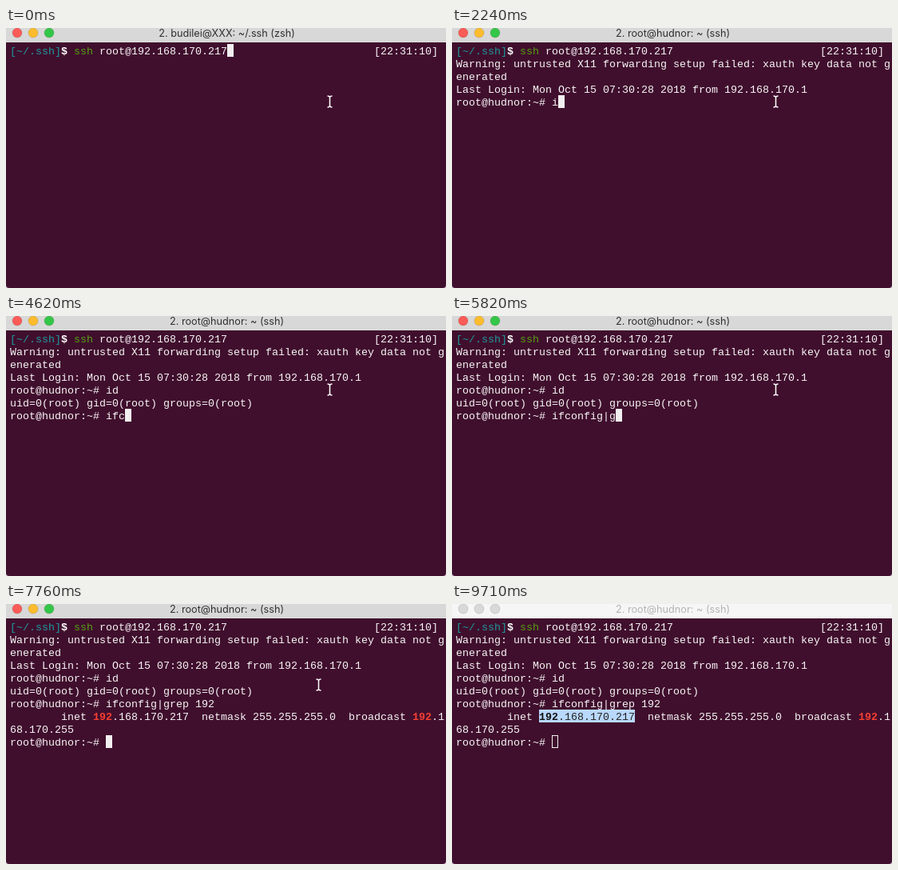
Recreate the animation shown at these times as an HTML page with a canvas. Size 551 px wide and 325 px high, loop 9.81 s.

```html
<!DOCTYPE html>
<html lang="en">
<head>
<meta charset="utf-8">
<title>Terminal session</title>
<style>
  html, body { margin: 0; width: 100%; height: 100%; overflow: hidden; }
  canvas { display: block; }
</style>
</head>
<body>
<canvas id="stage" width="551" height="325"></canvas>
<script>
const ctx = document.getElementById('stage').getContext('2d');
const W = 551, H = 325, BAR = 18;
const LOOP = 9810, TICK = 149.1, UNFOCUS = LOOP - 100;
const CELL = 8, ROW = 16, LEFT = 5, TOP = 20;
const MONO = '13.33px "Liberation Mono", monospace';
const SANS = '12.7px Inter, sans-serif';
const BG = '#400f2d', TEXT = '#f8f5f7', RED = '#f63f33', SELECT = '#b9d8fd';
const PROMPT = 'root@hudnor:~# ';
const ADDRESS_COL = 13, ADDRESS_END = 28;

// The screen refreshes once per tick; all moments below are tick numbers.
const WAIT = 3, WARN = 6, LOGIN = 7, CONNECTED = 12, TYPE_ID = 15, ID_DONE = 19,
  BLINK_OFF = 24, BLINK_ON = 27, TYPE_GREP = 29, GREP_DONE = 48, DRAG = 55, RELEASE = 59;

// Keys pressed in each tick; an empty entry is a pause.
const ID_KEYS = ['i', 'd'];
const GREP_KEYS = 'if,,c,o,n,f,ig,,|,,g,r,ep, ,,1,,9,2'.split(',');

const PATH = [
  { at: 51, x: 405, y: 92 },
  { at: 52, x: 391, y: 101 },
  { at: DRAG, x: 229, y: 150 },
  { at: 56, x: 186, y: 141 },
  { at: 57, x: 186, y: 141 },
  { at: RELEASE, x: 109, y: 141 },
  { at: 62, x: 487, y: 311 }
];

const typed = (keys, start, tick) => keys.slice(0, Math.max(0, tick - start + 1)).join('');
const colX = col => LEFT + col * CELL;
const rowY = row => TOP + row * ROW;

function pointerAt(tick) {
  const next = PATH.findIndex(p => p.at > tick);
  if (next === 0) return PATH[0];
  if (next < 0) return PATH[PATH.length - 1];
  const a = PATH[next - 1], b = PATH[next];
  const k = (tick - a.at) / (b.at - a.at);
  return { x: a.x + (b.x - a.x) * k, y: a.y + (b.y - a.y) * k };
}

function print(row, col, text, color = TEXT, bold = false) {
  ctx.font = (bold ? 'bold ' : '') + MONO;
  ctx.fillStyle = color;
  ctx.fillText(text, colX(col), rowY(row) + 13);
}

function block(row, col, hollow = false) {
  ctx.fillStyle = ctx.strokeStyle = '#f2eff0';
  ctx.lineWidth = 1;
  if (hollow) ctx.strokeRect(colX(col) + .5, rowY(row) + .5, CELL - 1, ROW - 1);
  else ctx.fillRect(colX(col), rowY(row), CELL, ROW);
}

function promptLine(row, command, cursor) {
  print(row, 0, PROMPT + command);
  if (cursor) block(row, PROMPT.length + command.length);
}

function titleText(tick) {
  if (tick < LOGIN) return '2. budilei@XXX: ~/.ssh (zsh)';
  return `2. root@hudnor: ~ (${tick < CONNECTED ? 'zsh' : 'ssh'})`;
}

function titleBar(tick, focused) {
  ctx.fillStyle = focused ? '#d8d8d8' : '#f6f6f6';
  ctx.fillRect(0, 0, W, BAR);
  ['#fc5b57', '#fdbc2e', '#34c648'].forEach((color, i) => {
    ctx.fillStyle = focused ? color : '#d9d9d9';
    ctx.strokeStyle = 'rgba(0, 0, 0, .12)';
    ctx.lineWidth = 1;
    ctx.beginPath();
    ctx.arc(14 + i * 20, 6, 6, 0, Math.PI * 2);
    ctx.fill();
    ctx.stroke();
  });
  ctx.font = SANS;
  ctx.fillStyle = focused ? '#303030' : '#b4b4b4';
  ctx.textAlign = 'center';
  ctx.fillText(titleText(tick), 276.5, 11);
  ctx.textAlign = 'left';
}

function pointer({ x, y }) {
  ctx.strokeStyle = '#fff';
  ctx.lineWidth = 1.5;
  ctx.beginPath();
  ctx.moveTo(x + .5, y - 5);
  ctx.lineTo(x + .5, y + 5);
  for (const side of [-1, 1]) {
    for (const end of [-1, 1]) {
      ctx.moveTo(x + .5, y + end * 5);
      ctx.quadraticCurveTo(x + .5, y + end * 7, x + .5 + side * 3, y + end * 7);
    }
  }
  ctx.stroke();
}

function address(color, lead) {
  print(7, ADDRESS_COL, '192', lead, true);
  print(7, ADDRESS_COL + 3, '.168.170.217', color);
}

function selection(tick) {
  const from = Math.floor((pointerAt(Math.min(tick, RELEASE)).x - LEFT) / CELL);
  ctx.save();
  ctx.beginPath();
  ctx.rect(colX(from), rowY(7), (ADDRESS_END - from) * CELL, ROW);
  ctx.clip();
  ctx.fillStyle = SELECT;
  ctx.fillRect(0, rowY(7), W, ROW);
  address('#222', '#111');
  ctx.restore();
}

function session(tick, focused) {
  print(0, 0, '[~/.ssh]', '#1c9a9f');
  print(0, 8, '$', '#fff', true);
  print(0, 10, 'ssh', '#55a010');
  print(0, 14, 'root@192.168.170.217');
  print(0, 57, '[22:31:10]');
  if (tick < WAIT) block(0, 34);
  if (tick < WARN) return;

  print(1, 0, 'Warning: untrusted X11 forwarding setup failed: xauth key data not g');
  print(2, 0, 'enerated');
  if (tick < LOGIN) return block(3, 0);

  print(3, 0, 'Last Login: Mon Oct 15 07:30:28 2018 from 192.168.170.1');
  promptLine(4, typed(ID_KEYS, TYPE_ID, tick), tick < ID_DONE);
  if (tick < ID_DONE) return;

  print(5, 0, 'uid=0(root) gid=0(root) groups=0(root)');
  const blinkedOff = tick >= BLINK_OFF && tick < BLINK_ON;
  promptLine(6, typed(GREP_KEYS, TYPE_GREP, tick), tick < GREP_DONE && !blinkedOff);
  if (tick < GREP_DONE) return;

  print(7, 8, 'inet');
  address(TEXT, RED);
  if (tick > DRAG) selection(tick);
  print(7, 30, 'netmask 255.255.255.0  broadcast');
  print(7, 63, '192', RED, true);
  print(7, 66, '.1');
  print(8, 0, '68.170.255');
  promptLine(9, '', false);
  block(9, PROMPT.length, !focused);
}

function draw(t) {
  const tick = Math.floor((t + 8) / TICK);
  const focused = t < UNFOCUS;
  ctx.fillStyle = '#d8d0d5';
  ctx.fillRect(0, 0, W, H);
  ctx.fillStyle = BG;
  ctx.beginPath();
  ctx.roundRect(0, 0, W, H, [0, 0, 4, 4]);
  ctx.fill();
  titleBar(tick, focused);
  session(tick, focused);
  if (focused) pointer(pointerAt(tick));
}

const begin = performance.now();
function animate() {
  draw((performance.now() - begin) % LOOP);
  requestAnimationFrame(animate);
}
draw(0);
requestAnimationFrame(animate);
</script>
</body>
</html>
```
